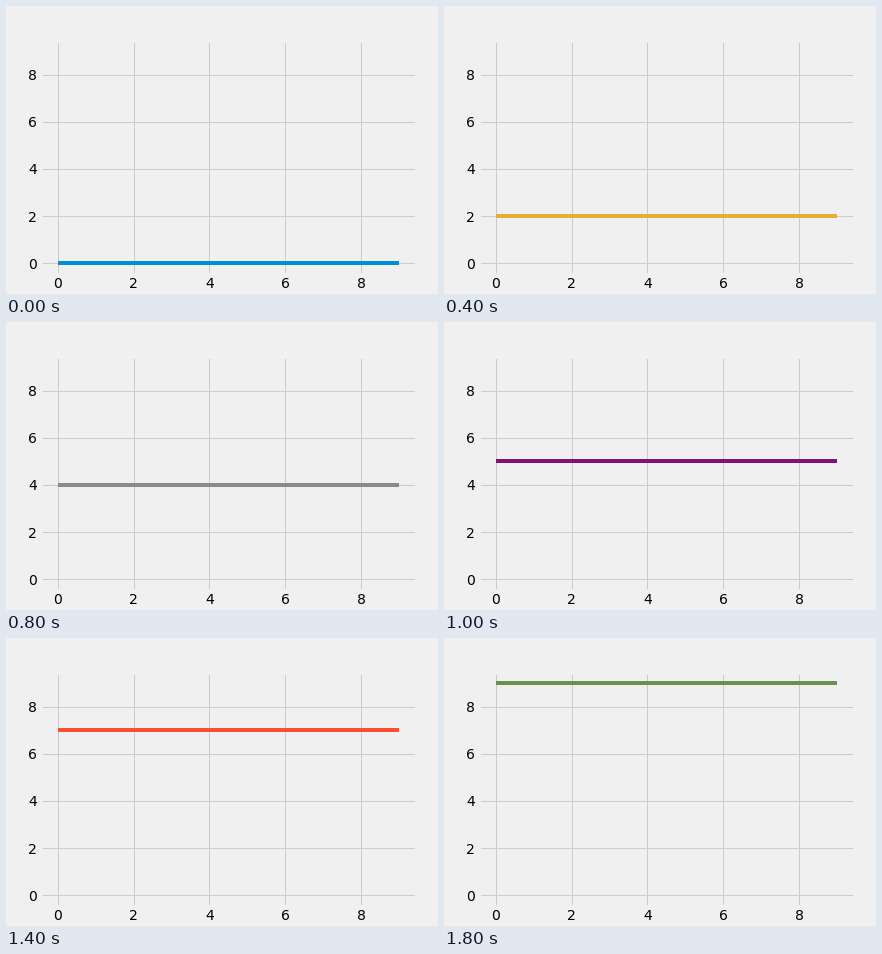
Animation of 432x288 px, one loop 2 s. Source, as a matplotlib script:

```python
import matplotlib.pyplot as plt
from matplotlib.animation import ArtistAnimation

STEPS = 10
LOOP_MS = 2000

plt.style.use("fivethirtyeight")
plt.rcParams["font.family"] = "DejaVu Sans"

fig, ax = plt.subplots(figsize=(6, 4), dpi=72)

# One level line per step; the style's colour cycle picks each colour.
xs = range(STEPS)
frames = [ax.plot(xs, [level] * STEPS) for level in range(STEPS)]

anim = ArtistAnimation(fig, frames, interval=LOOP_MS // STEPS,
                       repeat=True, repeat_delay=0, blit=False)

plt.show()
```
